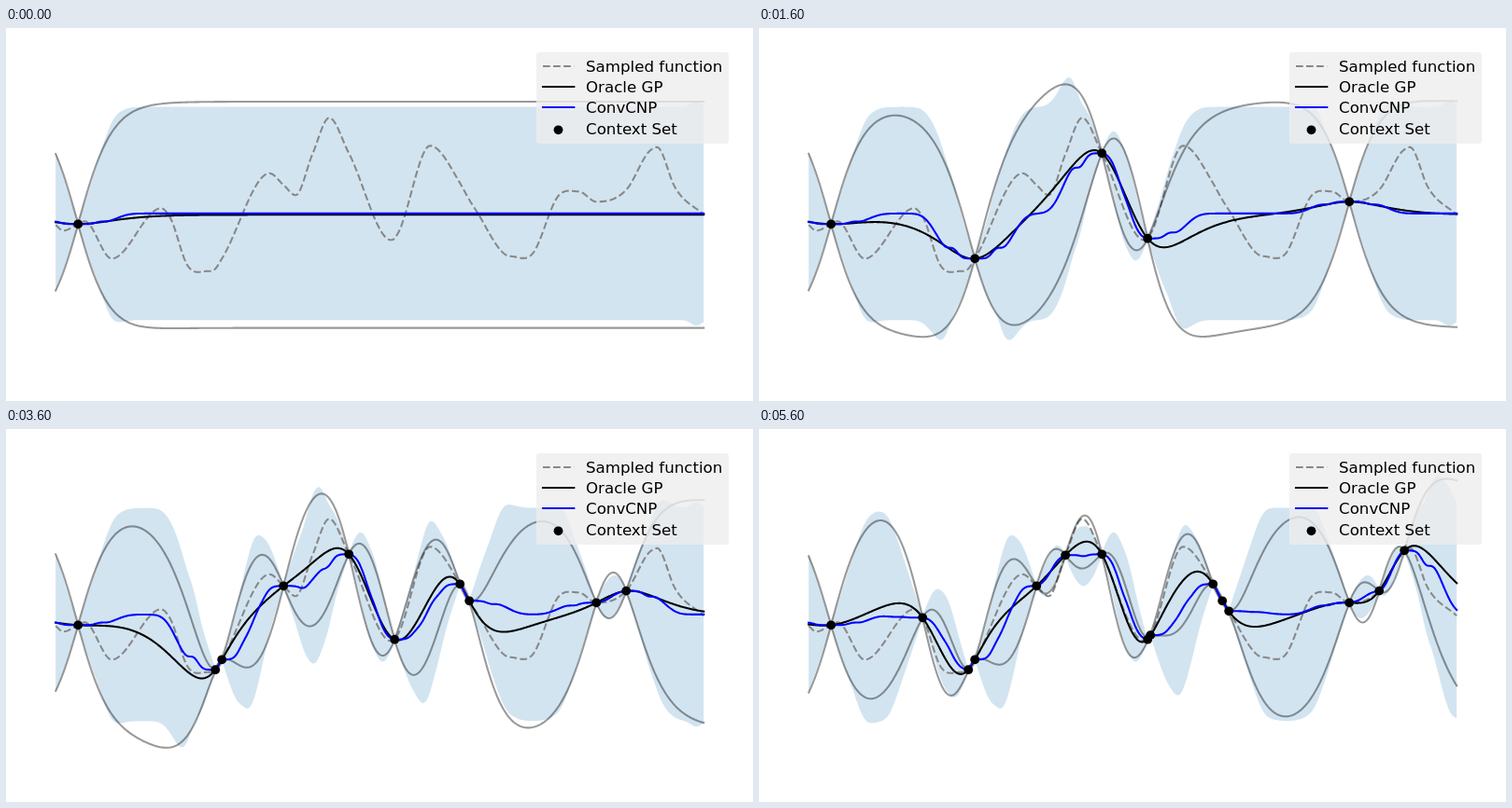
Write an HTML page that moves like this. It is 800x400 px and loops after 6 s.

```html
<!DOCTYPE html>
<html lang="en">
<head>
<meta charset="utf-8">
<title>Oracle GP and ConvCNP</title>
<style>
html, body { margin: 0; width: 100%; height: 100%; overflow: hidden; background: #fff; }
svg { display: block; width: 100vw; height: 100vh; }
path, line { fill: none; stroke-width: 2.08; stroke-linejoin: round; stroke-linecap: square; }
.band { fill: #1f77b4; fill-opacity: .2; stroke: none; }
.bound { stroke: #000; stroke-opacity: .4; }
.sample { stroke: #888; stroke-dasharray: 7.7 3.33; stroke-linecap: butt; }
.oracle { stroke: #000; }
.conv { stroke: #00f; }
text { font: 16.67px "DejaVu Sans", sans-serif; fill: #000; }
</style>
</head>
<body>
<svg viewBox="0 0 800 400">
  <g transform="translate(.2 .3)">
    <path class="band" id="band"/>
    <path class="sample" id="sample"/>
    <path class="bound" id="upper"/>
    <path class="bound" id="lower"/>
    <path class="oracle" id="oracle"/>
    <path class="conv" id="conv"/>
    <g id="dots"></g>
  </g>
  <rect x="568" y="26" width="206" height="98" rx="3.3" fill="#eee" fill-opacity=".8"/>
  <line class="sample" x1="575" y1="41" x2="608.3" y2="41"/>
  <line class="oracle" x1="575" y1="63" x2="608.3" y2="63"/>
  <line class="conv" x1="575" y1="85" x2="608.3" y2="85"/>
  <circle cx="591.5" cy="109.3" r="4.9"/>
  <text x="621" y="47">Sampled function</text>
  <text x="621" y="69">Oracle GP</text>
  <text x="621" y="91">ConvCNP</text>
  <text x="621" y="114">Context Set</text>
</svg>
<script>
const X0 = 53, X1 = 747, STEP = 400, LOOP = 6000;
const GP_ZERO = 200, GP_BAND = 121.3, LENGTH = 43.4, NOISE = 5e-4;
const CNP_ZERO = 198.6, CNP_BAND = 114.3;

// Context points in the order they are revealed
const context = [
  [77, 210], [231, 247], [632, 186], [367, 134], [416, 225.4],
  [224, 257.9], [664, 173.3], [496, 184], [486, 166], [297, 168],
  [419, 220.8], [503, 195], [691, 130], [328, 135], [175, 202]
];

// Peaks and valleys of the sampled function
const turns = [
  [53, 211], [61, 217], [84, 207], [113, 247], [166, 193], [194, 254], [215, 260.5],
  [282, 155.5], [310, 179], [346, 96], [412, 227], [454, 126], [540, 244.5],
  [563, 242.5], [592, 179], [613, 175], [634, 186], [697, 127.5], [716, 170], [747, 200]
];

const $ = id => document.getElementById(id);
const byX = (a, b) => a[0] - b[0];
const dot = (a, b) => a.reduce((s, v, i) => s + v * b[i], 0);
const bell = (x, c, w) => Math.exp(-(((x - c) / w) ** 2));
const grid = Array.from({ length: X1 - X0 + 1 }, (_, i) => X0 + i);
const join = pts => pts.map(p => p[0].toFixed(2) + ' ' + p[1].toFixed(2)).join('L');
const trace = f => 'M' + join(grid.map((x, i) => [x, f(x, i)]));

// Cubic spline that is level at every peak and valley
function spline(knots) {
  const last = knots.length - 1;
  const slope = i => (knots[i + 1][1] - knots[i][1]) / (knots[i + 1][0] - knots[i][0]);
  const tangents = knots.map((k, i) => {
    if (i === 0 || i === last) return slope(Math.min(i, last - 1));
    const before = slope(i - 1), after = slope(i);
    if (before * after <= 0) return 0;
    const a = k[0] - knots[i - 1][0], b = knots[i + 1][0] - k[0];
    return (before * b + after * a) / (a + b);
  });
  return x => {
    let i = 0;
    while (i < last - 1 && x > knots[i + 1][0]) i++;
    const [xa, ya] = knots[i], [xb, yb] = knots[i + 1];
    const h = xb - xa, t = (x - xa) / h, u = 1 - t;
    return ya * u * u * (1 + 2 * t) + yb * t * t * (3 - 2 * t)
      + h * t * u * (tangents[i] * u - tangents[i + 1] * t);
  };
}

// Matern 5/2
function kernel(d) {
  const a = Math.sqrt(5) * Math.abs(d) / LENGTH;
  return (1 + a + a * a / 3) * Math.exp(-a);
}

function invert(m) {
  const n = m.length;
  const a = m.map((row, i) => [...row, ...row.map((_, j) => +(i === j))]);
  for (let c = 0; c < n; c++) {
    const p = a[c][c];
    a[c] = a[c].map(v => v / p);
    for (let r = 0; r < n; r++) {
      if (r === c) continue;
      const f = a[r][c];
      a[r] = a[r].map((v, j) => v - f * a[c][j]);
    }
  }
  return a.map(row => row.slice(n));
}

function oracle(points) {
  const inv = invert(points.map((p, i) =>
    points.map((q, j) => kernel(p[0] - q[0]) + (i === j ? NOISE : 0))));
  const weights = inv.map(row => dot(row, points.map(p => p[1] - GP_ZERO)));
  return grid.map(x => {
    const k = points.map(p => kernel(x - p[0]));
    const variance = 1 - dot(k, inv.map(row => dot(row, k)));
    return [GP_ZERO + dot(k, weights), GP_BAND * Math.sqrt(Math.max(variance, 0))];
  });
}

// How strongly a point holds the ConvCNP mean at distance d
const pull = d => Math.exp(-((d / 44) ** 4)) - .15 * bell(d, 23, 7);

// How far the ConvCNP band has opened at distance d
function spread(d) {
  const r = d / 37.5 + .01;
  return r / (1 + r ** 10) ** .1;
}

function convcnp(points) {
  const sorted = [...points].sort(byX);
  return grid.map(x => {
    const left = sorted.filter(p => p[0] <= x).pop() || [-1e4, CNP_ZERO];
    const right = sorted.find(p => p[0] > x) || [1e4, CNP_ZERO];
    const dl = x - left[0], dr = right[0] - x;
    const pl = pull(dl), pr = pull(dr);
    const wl = pl / (dl + .01) ** 1.3, wr = pr / (dr + .01) ** 1.3;
    const blend = ((left[1] - CNP_ZERO) * wl + (right[1] - CNP_ZERO) * wr) / (wl + wr + 1e-12);
    const hold = 1 - (1 - pl) * (1 - pr);
    const flare = 6 * bell(x, 739, 8);
    return [CNP_ZERO + hold * blend, CNP_BAND * spread(dl) * spread(dr) + flare];
  });
}

const states = context.map((_, i) => {
  const points = context.slice(0, i + 1);
  const gp = oracle(points), cnp = convcnp(points);
  const top = grid.map((x, j) => [x, cnp[j][0] - cnp[j][1]]);
  const bottom = grid.map((x, j) => [x, cnp[j][0] + cnp[j][1]]).reverse();
  return {
    band: 'M' + join(top.concat(bottom)) + 'Z',
    upper: trace((x, j) => gp[j][0] - gp[j][1]),
    lower: trace((x, j) => gp[j][0] + gp[j][1]),
    oracle: trace((x, j) => gp[j][0]),
    conv: trace((x, j) => cnp[j][0])
  };
});

// The sampled function also runs through every context point
const known = new Map([...turns, ...context].map(p => [p[0], p]));
known.delete(634);
$('sample').setAttribute('d', trace(spline([...known.values()].sort(byX))));
$('dots').innerHTML = context.map(([x, y]) => `<circle cx="${x}" cy="${y}" r="4.9"/>`).join('');
const dots = [...$('dots').children];

let shown = -1;
function draw(time) {
  const step = Math.floor((time % LOOP) / STEP);
  if (step === shown) return;
  shown = step;
  for (const [id, d] of Object.entries(states[step])) $(id).setAttribute('d', d);
  dots.forEach((c, i) => c.setAttribute('visibility', i <= step ? 'visible' : 'hidden'));
}

const start = performance.now();
function tick() {
  draw(performance.now() - start);
  requestAnimationFrame(tick);
}
tick();
</script>
</body>
</html>
```
